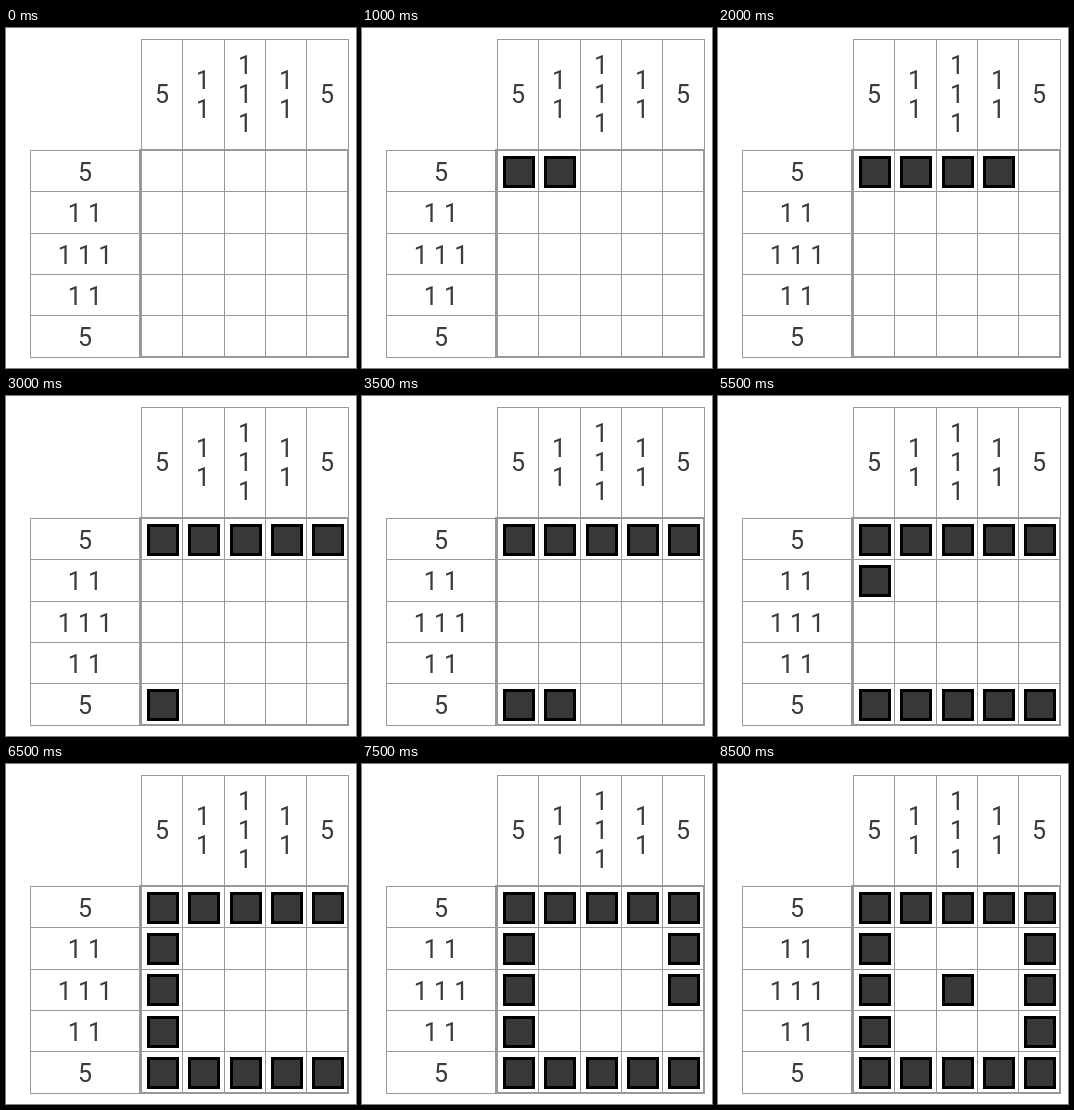
Recreate the animation shown at these times as an HTML page with a canvas. Size 350x340 px, loop 9 s.

```html
<!DOCTYPE html>
<html lang="en">
<head>
<meta charset="utf-8">
<title>Nonogram</title>
<style>
  html, body { margin: 0; width: 100%; height: 100%; overflow: hidden; background: #fff; }
  canvas { display: block; }
</style>
</head>
<body>
<canvas id="stage" width="350" height="340"></canvas>
<script>
const ctx = document.getElementById('stage').getContext('2d');
const STEP = 500, LOOP = 9000;
const PITCH = 41.3, LEFT = 24, TOP = 11, GRID_X = 135, GRID_Y = 122;
const hints = [['5'], ['1', '1'], ['1', '1', '1'], ['1', '1'], ['5']];
const indices = [0, 1, 2, 3, 4];

// Cells as [column, row], in the order they are solved.
const moves = [
  ...indices.map(c => [c, 0]),
  ...indices.map(c => [c, 4]),
  ...[1, 2, 3].map(r => [0, r]),
  ...[1, 2, 3].map(r => [4, r]),
  [2, 2]
];

const along = (start, i) => Math.round(start + i * PITCH);

function rect(color, x, y, w, h) {
  ctx.fillStyle = color;
  ctx.fillRect(x, y, w, h);
}

function drawGrid() {
  const right = along(GRID_X, 5), bottom = along(GRID_Y, 5);
  for (let i = 0; i <= 5; i++) {
    rect('#999', along(GRID_X, i), TOP, 1, bottom - TOP + 1);
    rect('#999', LEFT, along(GRID_Y, i), right - LEFT + 1, 1);
  }
  rect('#999', GRID_X, TOP, right - GRID_X + 1, 1);
  rect('#999', LEFT, GRID_Y, 1, bottom - GRID_Y + 1);
  // Heavier frame around the playing field.
  ctx.strokeStyle = '#999';
  ctx.lineWidth = 2;
  ctx.strokeRect(GRID_X - 1, GRID_Y, right - GRID_X + 1, bottom - GRID_Y);
}

function drawHints() {
  ctx.fillStyle = '#3c3c3c';
  ctx.font = '25px Roboto, Arial, sans-serif';
  ctx.textAlign = 'center';
  hints.forEach((hint, i) => {
    ctx.fillText(hint.join(' '), 79, along(153, i));
    hint.forEach((digit, k) => {
      ctx.fillText(digit, along(156, i), 75 + Math.round((k - (hint.length - 1) / 2) * 29));
    });
  });
}

function drawCell([column, row]) {
  const x = along(141, column), y = along(127.8, row);
  rect('#000', x, y, 32, 32);
  rect('#383838', x + 3, y + 3, 26, 26);
}

function draw() {
  const filled = Math.floor(performance.now() % LOOP / STEP);
  rect('#fff', 0, 0, 350, 340);
  drawGrid();
  drawHints();
  moves.slice(0, filled).forEach(drawCell);
  requestAnimationFrame(draw);
}
draw();
</script>
</body>
</html>
```
